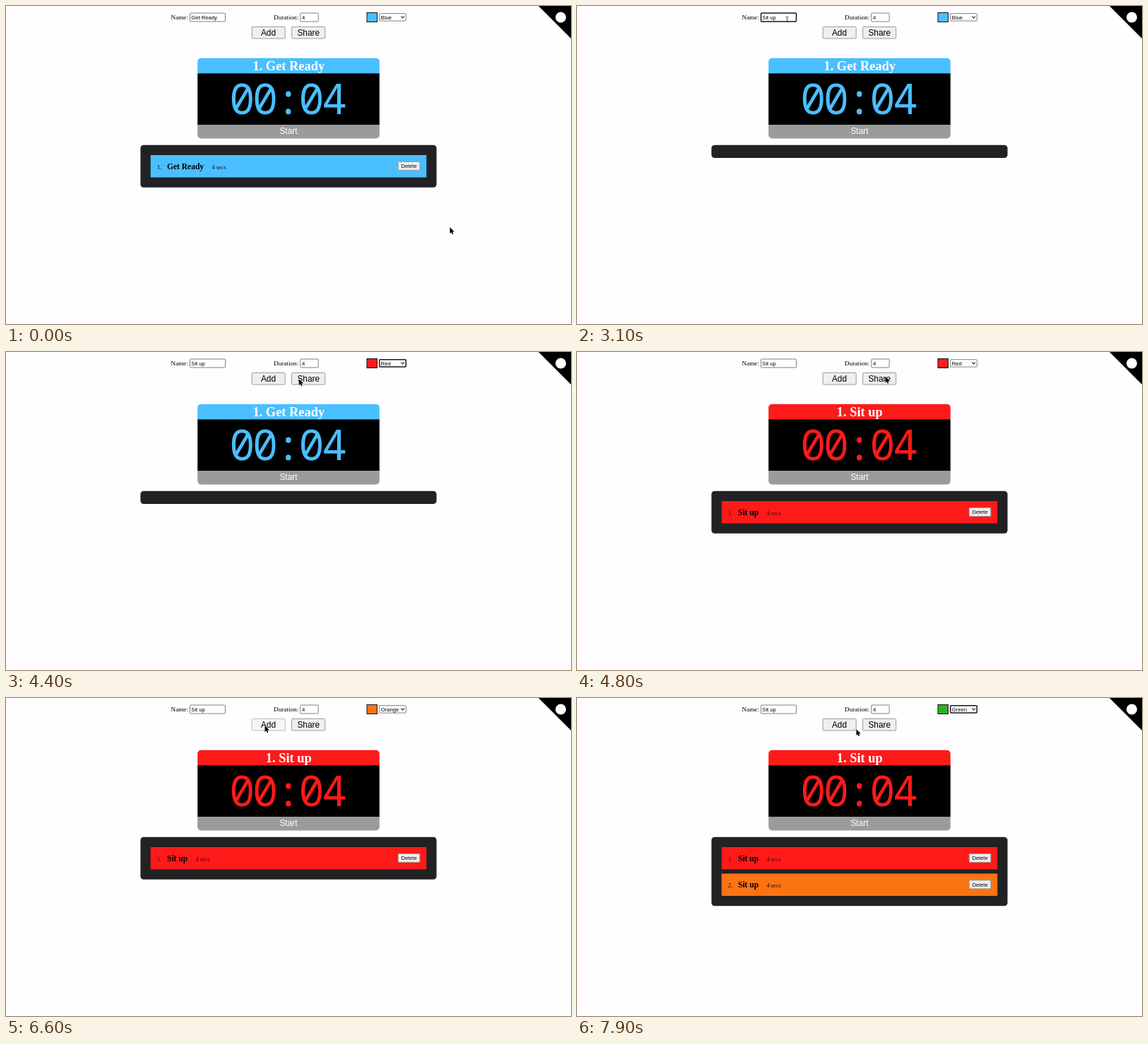
Write an HTML page that moves like this. It is 800 px wide and 450 px high and loops after 8 s.

```html
<!DOCTYPE html>
<html lang="en">
<head>
<meta charset="utf-8">
<title>Interval timer</title>
<style>
  html, body { margin: 0; width: 100%; height: 100%; overflow: hidden; background: #fefdff; }
  svg { display: block; width: 100vw; height: 100vh; }
  text { white-space: pre; }
  .serif { font-family: "Liberation Serif", serif; font-size: 9.2px; }
  .sans { font-family: "Liberation Sans", sans-serif; font-size: 7.67px; }
  .big { font-family: "Liberation Sans", sans-serif; font-size: 11.9px; }
  .digits { font-family: "Noto Sans Mono", monospace; font-size: 60px; letter-spacing: -3.25px; }
  .bold { font-weight: 700; }
  .mid { text-anchor: middle; }
  .field { fill: #fff; stroke: #808080; stroke-width: 1; }
  .focus { stroke: #181818; stroke-width: 1.5; }
  .button { fill: #efefef; stroke: #9a9a9a; stroke-width: 1; }
  .pressed { fill: #f6f6f6; stroke: #bbb; }
  .menu { fill: #fff; stroke: #aaa; stroke-width: .8; filter: drop-shadow(0 1.5px 2px #0005); }
</style>
</head>
<body>
<svg viewBox="0 0 800 450">
  <path d="M754 0H800V46Z"/>
  <circle cx="785.5" cy="16" r="7.5" fill="#fff"/>

  <text class="serif" x="233.5" y="18.7">Name:</text>
  <rect id="nameBox" class="field" x="260.5" y="10" width="50" height="12" rx="1"/>
  <rect id="selection" y="11.5" x="262" width="0" height="9" fill="#b0d0f5"/>
  <text id="nameText" class="sans" x="262.3" y="18.7"></text>
  <text class="serif" x="379" y="18.7">Duration:</text>
  <rect class="field" x="416.8" y="10" width="25.4" height="12" rx="1"/>
  <text class="sans" x="419" y="18.7">4</text>
  <rect id="swatch" x="511" y="9.5" width="14.5" height="13" stroke="#111"/>
  <rect id="selectBox" class="field" x="528.7" y="10.7" width="37.6" height="10.4" rx="1"/>
  <text id="selectText" class="sans" x="530.8" y="18.7"></text>
  <path d="M559.3 14.7l2.3 2.3 2.3-2.3" fill="none" stroke="#222" stroke-width="1.1"/>

  <rect id="addButton" class="button" x="348.2" y="29.4" width="47" height="16.6" rx="1"/>
  <text class="big mid" x="371.5" y="41.5">Add</text>
  <rect class="button" x="404.7" y="29.4" width="47" height="16.6" rx="1"/>
  <text class="big mid" x="428.3" y="41.5">Share</text>

  <clipPath id="round"><rect x="271.2" y="73.7" width="257.6" height="113.7" rx="5"/></clipPath>
  <g clip-path="url(#round)">
    <rect id="header" x="271" y="73" width="258" height="23"/>
    <rect x="271" y="95.4" width="258" height="73"/>
    <rect x="271" y="168" width="258" height="20" fill="#9b9b9b"/>
  </g>
  <text id="title" class="serif bold mid" x="400.3" y="90.7" fill="#fff" style="font-size:18.4px"></text>
  <text id="clock" class="digits" x="316.3" y="153">00:04</text>
  <text class="big mid" x="400" y="181.4" fill="#fff">Start</text>

  <rect id="panel" x="190.4" y="196.7" width="419.2" rx="4.5" fill="#222123"/>
  <g id="rows"></g>
  <g id="menu"></g>
  <g id="pointer">
    <path id="arrow" d="M0 0V9L2 7.2 3.3 10.2 4.8 9.5 3.5 6.6 6.3 6.4Z" stroke="#fff" stroke-width=".8" paint-order="stroke"/>
    <path id="beam" d="M-1.8-3.6Q0-3.6 0-2.6Q0-3.6 1.8-3.6M0-2.8V2.8M-1.8 3.6Q0 3.6 0 2.6Q0 3.6 1.8 3.6" fill="none" stroke="#333" stroke-width=".9"/>
  </g>
</svg>
<script>
const LOOP = 8000, STEP = 100;
const COLORS = { Blue: '#4abfff', Red: '#ff1a1a', Green: '#2ab41e', Purple: '#8a2be2', Orange: '#fc7314', Yellow: '#ffe135' };
const NAMES = Object.keys(COLORS);

// time, x, y
const PATH = [
  [0, 628.5, 313], [100, 625, 306], [400, 585, 240], [600, 572, 224], [900, 572, 224],
  [1000, 560, 214], [1200, 360, 70], [1300, 302.5, 25], [1400, 299, 19], [1500, 298, 18],
  [1800, 249, 18], [2400, 249, 18], [2700, 297.5, 19], [3100, 297.5, 19],
  [3300, 370, 17], [3600, 551, 14.5], [3800, 551, 14.5], [4000, 543, 34], [4100, 543, 35],
  [4500, 372, 39], [4600, 372, 39], [4800, 436.5, 34.5], [5200, 550, 15], [5400, 550, 15],
  [5800, 544, 62], [6000, 544, 63], [6400, 366.5, 39], [6700, 366.5, 39],
  [6800, 374, 38], [7200, 550, 15], [7300, 550, 15], [7500, 545, 44], [7600, 545, 44],
  [7900, 395.5, 44], [8000, 395.5, 44]
];
const TYPING = [[0, 'Get Ready'], [1900, 'S'], [2000, 'Si'], [2100, 'Sit'], [2200, 'Sit u'], [2300, 'Sit up']];
const CHOICE = [[0, 'Blue'], [4100, 'Red'], [6000, 'Orange'], [7600, 'Green']];
const TIMER = [[0, ['Get Ready', 'Blue']], [4600, ['Sit up', 'Red']]];
const LISTS = [
  [0, [['Get Ready', 'Blue']]],
  [700, []],
  [4600, [['Sit up', 'Red']]],
  [6700, [['Sit up', 'Red'], ['Sit up', 'Orange']]]
];
const MENU_OPEN = [[3700, 4100], [5300, 6000], [7300, 7600]];
const SELECT_FOCUS = [[4100, 4500], [6000, 6500], [7600, 8000]];
const ADD_PRESSED = [[4500, 4600], [6500, 6700]];

const $ = id => document.getElementById(id);
const latest = (table, t) => table.filter(([start]) => start <= t).pop()[1];
const within = (spans, t) => spans.some(([a, b]) => t >= a && t < b);

function pointerAt(t) {
  const i = PATH.findIndex(([end]) => end > t);
  const [t0, x0, y0] = PATH[i - 1], [t1, x1, y1] = PATH[i];
  const k = (t - t0) / (t1 - t0);
  return [x0 + (x1 - x0) * k, y0 + (y1 - y0) * k];
}

function rowMarkup([name, color], i) {
  const y = 211 + i * 37.5, base = y + 19.6;
  const secsX = name === 'Sit up' ? 268.5 : 291.5;
  const faint = color === 'Red' ? '#4a0808' : '#111';
  return `<rect x="204.7" y="${y}" width="390.6" height="31.5" fill="${COLORS[color]}"/>
    <text class="serif" x="213.7" y="${base}" fill="${faint}">${i + 1}.</text>
    <text class="serif bold" x="228" y="${base}" style="font-size:11.5px">${name}</text>
    <text class="serif" x="${secsX}" y="${base}" fill="${faint}" style="font-size:8.4px">4 secs</text>
    <rect class="button" x="555.3" y="${y + 9.4}" width="30.6" height="12" rx="1"/>
    <text class="sans mid" x="570.6" y="${y + 18}">Delete</text>`;
}

function menuMarkup(active) {
  const items = NAMES.map((name, i) => {
    const y = 21 + i * 9.4, on = i === active;
    return (on ? `<rect x="529" y="${y}" width="37" height="9.6" fill="#4585d8"/>` : '') +
      `<text class="sans" x="531" y="${y + 7.3}" fill="${on ? '#e4efff' : '#111'}">${name}</text>`;
  });
  return '<rect class="menu" x="528.8" y="20.8" width="37.6" height="57.6"/>' + items.join('');
}

function draw(t) {
  const [x, y] = pointerAt(t);
  const choice = latest(CHOICE, t), list = latest(LISTS, t);
  const [title, timerColor] = latest(TIMER, t);

  $('nameText').textContent = latest(TYPING, t);
  $('nameBox').classList.toggle('focus', t >= 1400 && t < 3700);
  const selecting = t >= 1500 && t < 1900;
  const left = Math.max(262, Math.min(x, 299));
  $('selection').setAttribute('x', left);
  $('selection').setAttribute('width', selecting ? 299 - left : 0);

  $('swatch').setAttribute('fill', COLORS[choice]);
  $('selectText').textContent = choice;
  $('selectBox').classList.toggle('focus', within(SELECT_FOCUS, t));
  $('addButton').classList.toggle('pressed', within(ADD_PRESSED, t));

  $('header').setAttribute('fill', COLORS[timerColor]);
  $('clock').setAttribute('fill', COLORS[timerColor]);
  $('title').textContent = '1. ' + title;
  $('panel').setAttribute('height', list.length ? 22.5 + 37.5 * list.length : 18.3);
  $('rows').innerHTML = list.map(rowMarkup).join('');

  const hovered = y < 21 ? NAMES.indexOf(choice) : Math.min(5, Math.floor((y - 21) / 9.4));
  $('menu').innerHTML = within(MENU_OPEN, t) ? menuMarkup(hovered) : '';

  const beam = t >= 1400 && t < 3200;
  $('arrow').style.display = beam ? 'none' : '';
  $('beam').style.display = beam ? '' : 'none';
  $('pointer').setAttribute('transform', `translate(${x} ${y})`);
}

const began = performance.now();
let shown = -1;
function tick() {
  const t = Math.floor(((performance.now() - began) % LOOP) / STEP) * STEP;
  if (t !== shown) draw(shown = t);
  requestAnimationFrame(tick);
}
tick();
</script>
</body>
</html>
```
